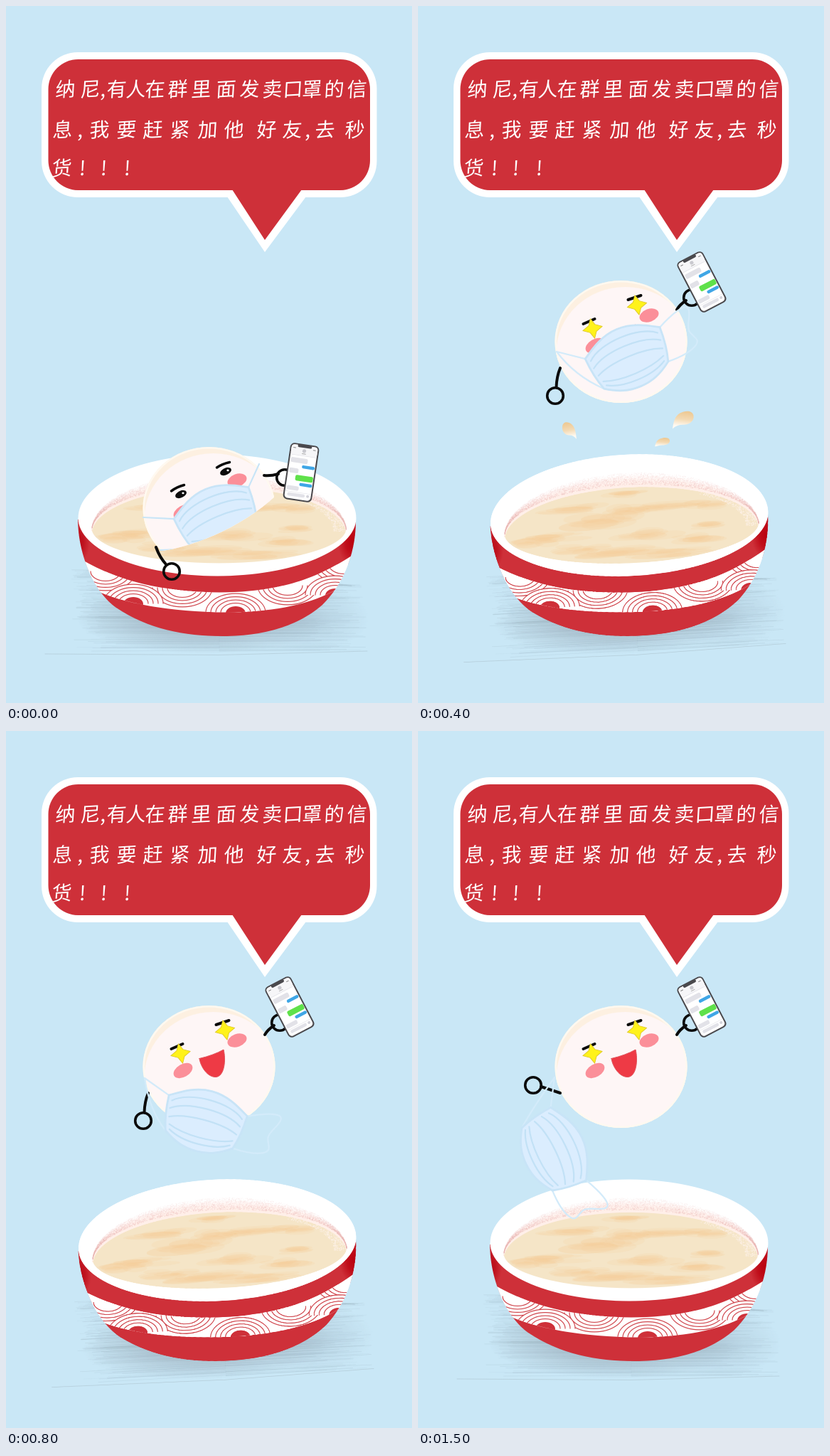
These frames come from a looping animation (571x980 px, 1700 ms). An HTML page with a canvas:

```html
<!DOCTYPE html>
<html lang="zh">
<head>
<meta charset="utf-8">
<title>Bowl</title>
<style>
  html, body { margin: 0; width: 100%; height: 100%; overflow: hidden; background: #c9e7f6; }
  canvas { display: block; width: 571px; height: 980px; }
</style>
</head>
<body>
<canvas id="stage" width="571" height="980"></canvas>
<script>
const W = 571, H = 980, RED = '#ce3039', SKY = '#c9e7f6', INK = '#0b0b0b';
const ctx = document.getElementById('stage').getContext('2d');
const rad = deg => deg * Math.PI / 180;

function random(seed) {
  return () => (seed = (seed * 16807) % 2147483647) / 2147483647;
}

function fill(c, d, color) {
  c.fillStyle = color;
  c.fill(new Path2D(d));
}

function line(c, d, color, width) {
  c.strokeStyle = color;
  c.lineWidth = width;
  c.stroke(new Path2D(d));
}

function oval(c, x, y, rx, ry, color, tilt = 0) {
  c.fillStyle = color;
  c.beginPath();
  c.ellipse(x, y, rx, ry, rad(tilt), 0, 7);
  c.fill();
}

function box(c, x, y, w, h, r, color) {
  c.fillStyle = color;
  c.beginPath();
  c.roundRect(x, y, w, h, r);
  c.fill();
}

function glow(c, x, y, rx, ry, rgb, alpha) {
  c.save();
  c.translate(x, y);
  c.scale(rx, ry);
  const g = c.createRadialGradient(0, 0, 0, 0, 0, 1);
  g.addColorStop(0, `rgba(${rgb},${alpha})`);
  g.addColorStop(0.5, `rgba(${rgb},${alpha * 0.7})`);
  g.addColorStop(1, `rgba(${rgb},0)`);
  oval(c, 0, 0, 1, 1, g);
  c.restore();
}

function layer(paint) {
  const el = document.createElement('canvas');
  el.width = W * 2;
  el.height = H * 2;
  const c = el.getContext('2d');
  c.scale(2, 2);
  c.lineCap = c.lineJoin = 'round';
  paint(c);
  return el;
}

// Speech bubble
const LINES = [
  [127, '纳尼,有人在群里面发卖口罩的信', [83, 118, 136, 155, 182, 209, 241, 274, 309, 342, 374, 403, 430, 461, 493]],
  [184, '息,我要赶紧加他好友,去秒', [79, 104, 131, 169, 206, 244, 283, 320, 366, 402, 424, 448, 490]],
  [238, '货!!!', [78, 107, 137, 170]]
];

function bubble(c) {
  box(c, 50, 65, 471.5, 204, 51, '#fff');
  fill(c, 'M311 268L364 346L422 268Z', '#fff');
  box(c, 59.5, 75, 452.5, 184, 42, RED);
  fill(c, 'M318 258L364 329L416 258Z', RED);
  c.fillStyle = '#fff';
  c.textAlign = 'center';
  c.font = '300 28px "Noto Sans CJK SC", "Noto Sans CJK", sans-serif';
  for (const [y, text, xs] of LINES) {
    [...text].forEach((ch, i) => {
      c.save();
      c.translate(xs[i], y);
      c.transform(1, -0.06, -0.06, 1, 0, 0);
      c.fillText(ch, 0, 0);
      c.restore();
    });
  }
}

// Bowl
const BODY = new Path2D('M101 722C102 775 125 825 155 846C200 876 250 886 305 886C370 886 415 868 445 842C472 815 491 775 492 726Z');
const BAND = new Path2D('M98 773C152 808 220 824 300 824.5C380 824 432 808 486 773L480 810L460 823C420 844 370 852 310 852.5C230 852 165 840 122 820Z');
const RIM = new Path2D('M101.5 720A195.5 89.5 0 0 1 492.5 720A195.5 81.5 0 0 1 101.5 720Z');
const SOUP = new Path2D('M121 738A179 66 0 0 1 478 738A179 49 0 0 1 121 738Z');

function shadow(c) {
  const rnd = random(41);
  glow(c, 280, 862, 180, 48, '135,150,162', 0.55);
  glow(c, 425, 860, 85, 48, '150,172,188', 0.25);
  c.lineWidth = 1;
  for (let i = 0; i < 260; i++) {
    const y = 792 + rnd() * 116, low = (y - 792) / 116;
    const left = 92 + 45 * low * rnd() + 25 * rnd();
    const right = 508 - 90 * rnd();
    const half = rnd() < 0.5;
    c.strokeStyle = `rgba(135,155,168,${0.04 + 0.11 * rnd()})`;
    c.beginPath();
    c.moveTo(half ? left : 300, y);
    c.lineTo(half ? 300 : right, Math.max(y, half ? 0 : 815) - 1 + 2 * rnd());
    c.stroke();
  }
  line(c, 'M55 911L300 912.5L508 907', 'rgba(160,180,190,.4)', 1);
}

function rings(c, x, y, down) {
  const turn = down ? 0 : Math.PI;
  c.lineWidth = 1.2;
  c.strokeStyle = '#d0474e';
  for (let r = 42; r > 14; r -= 7) {
    c.beginPath();
    c.ellipse(x, y, r, r * 0.64, 0, turn, turn + Math.PI);
    c.fillStyle = '#fff';
    c.fill();
    c.stroke();
  }
  if (!down) oval(c, x, y + 1, 14, 10, RED);
}

function soup(c) {
  const rnd = random(97);
  c.save();
  c.beginPath();
  c.rect(100, 640, 400, 98);
  c.clip();
  for (let i = 0; i < 8; i++) oval(c, 299, 738, 179, 78 - 1.5 * i, 'rgba(247,222,212,.1)');
  c.restore();
  for (let i = 0; i < 4200; i++) {
    const a = Math.PI * (1.02 + 0.97 * rnd()), k = rnd();
    c.fillStyle = `rgba(232,180,178,${0.08 + 0.24 * k})`;
    c.fillRect(299 + 179 * Math.cos(a), 738 + (82 - 17 * k) * Math.sin(a), 1.1, 1.1);
  }
  c.save();
  c.clip(SOUP);
  c.fillStyle = '#f5e5c7';
  c.fillRect(110, 660, 380, 140);
  const patches = [
    [290, 712, 42, 7], [258, 722, 48, 7], [225, 704, 46, 4], [165, 748, 40, 5], [195, 742, 48, 4],
    [345, 705, 50, 4], [320, 742, 45, 5], [395, 751, 38, 5], [275, 768, 85, 5], [350, 772, 60, 4],
    [415, 735, 34, 3], [290, 684, 30, 4], [405, 706, 28, 4], [230, 760, 40, 4]
  ];
  for (const [x, y, rx, ry] of patches) {
    for (let i = 0; i < 8; i++) {
      oval(c, x + (rnd() - 0.5) * rx, y + (rnd() - 0.5) * ry * 2, rx * (0.4 + 0.5 * rnd()), ry * (0.6 + 0.6 * rnd()),
        'rgba(236,200,145,.14)', -4 + 5 * rnd());
    }
  }
  for (let i = 0; i < 400; i++) {
    const a = Math.PI * (1.7 + 0.3 * rnd()), k = 0.9 + 0.1 * rnd();
    c.fillStyle = 'rgba(255,246,240,.5)';
    c.fillRect(299 + 179 * k * Math.cos(a), 738 + 66 * k * Math.sin(a), 1.3, 1.3);
  }
  c.restore();
}

function bowl(c) {
  shadow(c);
  c.save();
  c.clip(BODY);
  c.fillStyle = RED;
  c.fillRect(90, 700, 420, 200);
  glow(c, 100, 754, 18, 30, '180,0,14', 0.85);
  glow(c, 489, 754, 22, 34, '185,0,14', 1);
  c.clip(BAND);
  c.fillStyle = '#fff';
  c.fillRect(90, 760, 420, 100);
  [[140, 795], [248, 818], [396, 815], [475, 785]].forEach(p => rings(c, ...p, true));
  [[179, 840], [323, 853], [463, 828]].forEach(p => rings(c, ...p, false));
  c.restore();
  c.fillStyle = '#fff';
  c.fill(RIM);
  soup(c);
}

const bubbleArt = layer(bubble);
const bowlArt = layer(bowl);

// Dumpling; face coordinates are relative to its centre
function ball(c, y, happy) {
  c.save();
  c.translate(285.5, y);
  oval(c, 0, 0, 93, 86, '#fdf0e1');
  c.save();
  c.beginPath();
  c.ellipse(0, 0, 93, 86, 0, 0, 7);
  c.clip();
  oval(c, 6, 15, 97, 92, '#fef6f6');
  c.restore();
  c.strokeStyle = '#fff9f0';
  c.lineWidth = 2.5;
  c.beginPath();
  c.ellipse(0, 0, 91.8, 84.8, 0, 0, 7);
  c.stroke();
  const blush = '#fb8f99';
  oval(c, 39.5, -37 - (happy ? 0 : 2), 14, 9, blush, -20);
  oval(c, -36.5, 5.5, 14.5, 9, blush, -30);
  if (happy) {
    line(c, 'M-53 -25L-37 -32M10 -59L28 -65', INK, 4);
    star(c, -40, -18.5);
    star(c, 22.5, -51.5);
    const mouth = 'M-13.5 -11.5Q6 -16 20.5 -24C24 -10 22 14 9.5 14.5C-2 15 -12 0 -13.5 -11.5Z';
    fill(c, mouth, '#ee3a45');
    line(c, mouth, '#e2545c', 1);
  } else {
    line(c, 'M-53 -24Q-45 -30 -35 -32.5M11 -57Q18 -62 29 -64.5', INK, 3.5);
    for (const [x, ey] of [[-39.5, -19.5], [23.5, -51.5]]) {
      oval(c, x, ey, 8.5, 4.8, INK, -25);
      oval(c, x + 3, ey - 1.6, 1.6, 1.3, '#fff');
    }
  }
  c.restore();
}

function star(c, x, y) {
  c.save();
  c.translate(x, y);
  c.rotate(-0.22);
  const d = 'M0 -14L4.5 -5L14 0L4.5 5L0 14L-4.5 5L-14 0L-4.5 -5Z';
  fill(c, d, '#fff21a');
  line(c, d, '#e0cc2c', 1);
  c.restore();
}

function mask(c, { x, y, tilt, hook, loop }) {
  const a = rad(tilt), thread = loop ? '#d3ebfa' : '#c8e5f7';
  const at = (px, py) => [x + px * Math.cos(a) - py * Math.sin(a), y + px * Math.sin(a) + py * Math.cos(a)];
  const [tx, ty] = at(-57, -24), [bx, by] = at(-49, 25);
  const [h1x, h1y, h2x, h2y] = hook;
  const sag = loop ? 8 : 0;
  line(c, `M${h1x} ${h1y}L${tx} ${ty}M${h2x} ${h2y}Q${(h2x + bx) / 2 - sag} ${(h2y + by) / 2 + sag} ${bx} ${by}`, thread, 2.2);
  if (!loop) {
    const [rx, ry] = at(57, -24), [sx, sy] = at(49, 25);
    line(c, `M${rx} ${ry}L356 ${y - 77}M${sx} ${sy}L378 ${y - 20}`, thread, 2.2);
  }
  c.save();
  c.translate(x, y);
  c.rotate(a);
  if (loop) line(c, 'M57 -24C75 -32 103 -43 104 -32C104 -22 92 -12 93 -2C95 8 104 14 92 20C80 26 65 26 49 25', thread, 2.2);
  const shape = 'M-57 -24C-42 -33 -24 -45 0 -45C24 -45 42 -33 57 -24Q56 4 49 25C32 37 18 42 0 42C-18 42 -32 37 -49 25Q-56 4 -57 -24Z';
  fill(c, shape, '#dbedfe');
  line(c, shape, '#c8e4f7', 2.8);
  line(c, 'M-51 -18C-30 -37 30 -37 51 -18M-51 -7C-28 -23 28 -23 51 -7M-49 5C-25 -6 25 -6 49 5M-46 15C-22 25 22 25 46 15M-44 22C-22 35 22 35 44 22', '#c2e1f6', 2.2);
  c.restore();
}

function hand(c, x, y) {
  c.strokeStyle = INK;
  c.lineWidth = 3.6;
  c.beginPath();
  c.arc(x, y, 11.3, 0, 7);
  c.stroke();
}

function phone(c, x, y, tilt) {
  c.save();
  c.translate(x, y);
  c.rotate(rad(tilt));
  box(c, -20.5, -40, 41, 80, 6, '#4a494d');
  box(c, -18.5, -38, 37, 76, 4.5, '#fff');
  box(c, -18.5, -38, 37, 14, 4, '#f6f6f8');
  box(c, -10, -39, 20, 4, 2, '#4a494d');
  oval(c, 0, -30.5, 2.6, 2.6, '#c9c9cf');
  const grey = '#e2e2e8', blue = '#3fa6e6';
  const chat = [
    [-18.5, -24, 37, 0.7, grey], [-3, -27, 6, 1, '#aaa'], [-16, -34, 4, 1, '#888'], [12, -34, 4, 1, '#888'],
    [-17, -20, 24, 7, grey], [0, -10.5, 18, 4.5, blue], [-17, -5, 13, 7, grey], [-7, 4, 25, 8, '#5fe14a'],
    [0, 14.5, 18, 4.5, blue], [-17, 20, 17, 6, grey], [-18.5, 28, 37, 0.7, grey], [-15, 30, 25, 4.5, grey], [12, 30, 4, 4, '#d3d3da']
  ];
  for (const [bx, by, w, h, color] of chat) box(c, bx, by, w, h, Math.min(2, h / 2), color);
  c.restore();
}

// Teardrop inside a w by h box at (x, y); flip points the tail right
function drop(c, x, y, w, h, flip, show) {
  c.save();
  c.translate(x + (flip ? w : 0), y);
  c.scale(flip ? -w : w, h);
  c.beginPath();
  c.rect(-0.1, -0.1, 1.2, show + 0.1);
  c.clip();
  const g = c.createLinearGradient(0.5, 0, 0.35, 1);
  g.addColorStop(0, '#edc892');
  g.addColorStop(0.45, '#f3dab4');
  g.addColorStop(0.85, '#fffaf2');
  fill(c, 'M0 1C0.05 0.6 0.1 0.3 0.35 0.12C0.6 -0.05 0.95 -0.05 1 0.25C1.05 0.6 0.75 0.78 0.5 0.77C0.3 0.77 0.12 0.85 0 1Z', g);
  c.restore();
}

function drops(c, dy, show) {
  drop(c, 203, 585 + dy, 20, 24, true, show);
  drop(c, 358, 569.5 + dy, 29.5, 25, false, show + 0.08);
  drop(c, 333, 607 + dy, 21, 13.5, false, show - 0.1);
}

// Poses
const up = { arm: 'M364 427Q368 420 377 414', grip: [385, 410], phone: [399, 388, -27.5] };
const low = y => ({
  ball: y, arm: `M363 ${y - 46}Q372 ${y - 45} 383 ${y - 48}`, grip: [392, y - 43], phone: [415, y - 50, 8.5],
  mask: { x: 298, y: y + 15, tilt: -23, hook: [193, y + 13, 217, y + 59] }
});
const high = (x, y, tilt, hx, hy) => ({
  ball: 472, happy: true, mask: { x, y, tilt, hook: [hx, hy, hx, hy], loop: true }
});
const hang = { left: 'M200 509Q195 521 194.5 536', fist: [193, 548] };

const POSES = [
  { ...low(706), sunk: true, bowl: 0, left: 'M211 761Q216 775 225 785', fist: [233, 795] },
  { ...low(525), bowl: -6.5, drops: [67, 0.72], left: 'M200 561Q188 571 181 583', fist: [176, 593] },
  { ...high(297, 496, -23, 195, 486), ...up, ...hang, bowl: -2.8, drops: [0, 1] },
  { ...high(290, 527, -5.5, 193, 484), bowl: 4.7, drops: [24, 0.93], left: 'M200 510Q189 515 178 524', fist: [168, 532],
    arm: 'M364 426Q372 424 382 420', grip: [391, 421], phone: [411, 407, -5] },
  { ...high(278, 550, 15, 195, 488), ...up, ...hang, bowl: -2.8 },
  { ...high(252, 575, 32, 192, 487), bowl: 4.7, left: 'M200 509Q190 518 183 531', fist: [177, 541],
    arm: 'M363 427Q372 426 382 423', grip: [391, 424], phone: [413.5, 412, 0] },
  { ...high(190, 591, 64, 192, 487), ...up, bowl: 0, left: 'M200 509L173 500', fist: [162, 498] }
];
const STEP = 200, LOOP = 1700;
const ABOVE_SOUP = new Path2D('M170 600V768H205C255 764 330 735 380 688V600Z');

function draw(p) {
  const c = ctx;
  c.lineCap = c.lineJoin = 'round';
  c.fillStyle = SKY;
  c.fillRect(0, 0, W, H);
  c.drawImage(bubbleArt, 0, 0, W, H);

  c.save();
  c.translate(297, 716);
  c.rotate(rad(p.bowl));
  c.drawImage(bowlArt, -297, -716, W, H);
  c.restore();
  if (p.drops) drops(c, ...p.drops);

  c.save();
  if (p.sunk) c.clip(ABOVE_SOUP);
  ball(c, p.ball, p.happy);
  c.restore();

  line(c, p.left, INK, 4);
  hand(c, ...p.fist);
  line(c, p.arm, INK, 4);
  hand(c, ...p.grip);
  phone(c, ...p.phone);

  c.save();
  if (p.sunk) c.clip(ABOVE_SOUP);
  mask(c, p.mask);
  c.restore();
}

const start = performance.now();
function tick() {
  const t = (performance.now() - start) % LOOP;
  draw(POSES[Math.min(POSES.length - 1, Math.floor(t / STEP))]);
  requestAnimationFrame(tick);
}
tick();
</script>
</body>
</html>
```
